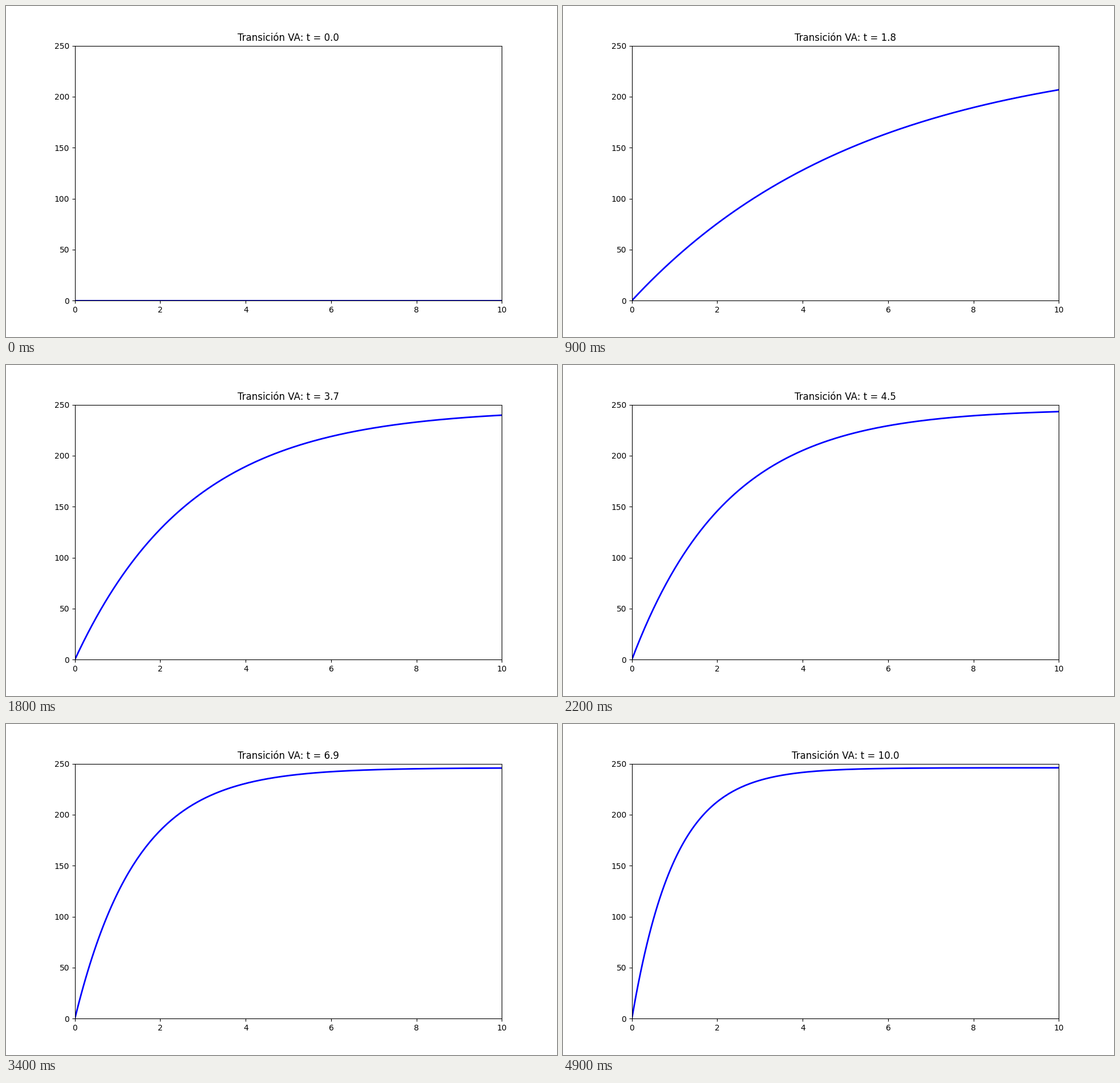
Write a matplotlib script that moves like this. It is 966 px wide and 580 px high and loops after 5000 ms.

```python
import matplotlib.pyplot as plt
import numpy as np
from matplotlib.animation import FuncAnimation

FRAMES = 50
LIMIT = 246.0  # value the curve saturates at
RATE = 0.1

plt.rcParams["font.family"] = "DejaVu Sans"

x = np.linspace(0, 10, 200)
times = np.linspace(0, 10, FRAMES)

fig, ax = plt.subplots(figsize=(9.66, 5.8), dpi=100)
ax.set_xlim(0, 10)
ax.set_ylim(0, 250)
curve, = ax.plot(x, np.zeros_like(x), color="blue", lw=2)
title = ax.set_title("")


def update(frame):
    t = times[frame]
    curve.set_ydata(LIMIT * (1 - np.exp(-RATE * t * x)))
    title.set_text(f"Transición VA: t = {t:.1f}")
    return curve, title


animation = FuncAnimation(fig, update, frames=FRAMES, interval=100,
                          repeat=True, repeat_delay=0, blit=False)
plt.show()
```
